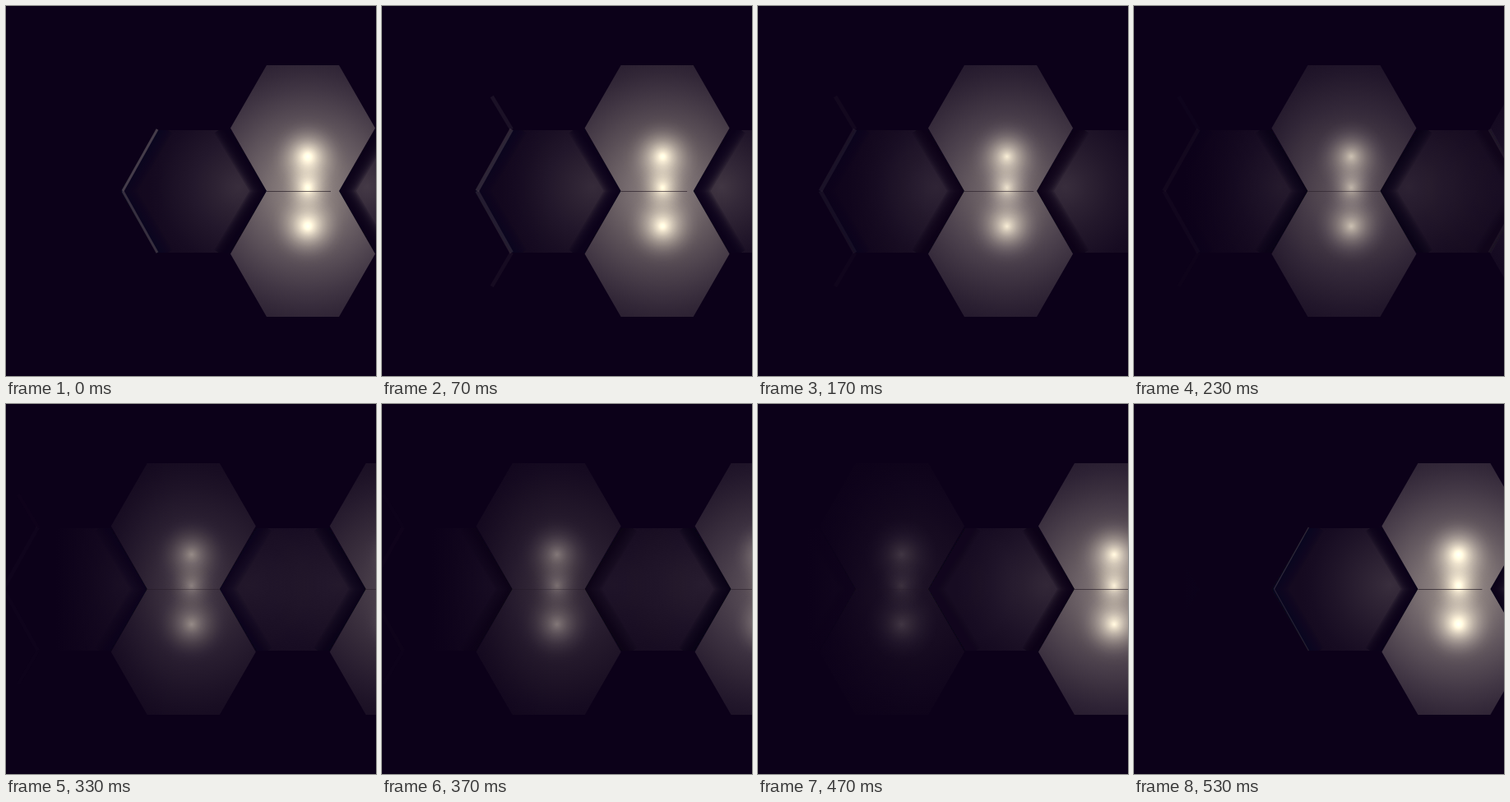
Write an HTML page with a canvas that moves like this. It is 450 px wide and 450 px high and loops after 560 ms.

```html
<!DOCTYPE html>
<html lang="en">
<head>
<meta charset="utf-8">
<title>Hexagon lights</title>
<style>
  html, body { margin: 0; width: 100%; height: 100%; overflow: hidden; background: #0c0119; }
  canvas { display: block; width: 450px; height: 450px; }
</style>
</head>
<body>
<canvas id="stage" width="450" height="450"></canvas>
<script>
const ctx = document.getElementById('stage').getContext('2d');
const LOOP = 560, PERIOD = 266, STEP = 13.2, MID = 225;
const BG = '12,1,25';

const clamp = v => Math.min(1, Math.max(0, v));
const smooth = v => clamp(v) ** 2 * (3 - 2 * clamp(v));
const warm = level => `rgb(${level},${level},${level * .8})`;

// A pair lights up as it enters on the right and dims on its way left
const brightness = x => smooth((x - 130) / 250) * clamp((535 - x) / 130);

function hex(cx, cy, halfW, halfH) {
  const f = halfW / 2;
  ctx.moveTo(cx - halfW, cy);
  ctx.lineTo(cx - f, cy - halfH);
  ctx.lineTo(cx + f, cy - halfH);
  ctx.lineTo(cx + halfW, cy);
  ctx.lineTo(cx + f, cy + halfH);
  ctx.lineTo(cx - f, cy + halfH);
  ctx.closePath();
}

// Radial light that falls off as (1 - distance)^power
function glow(x, y, r, peak, power) {
  const g = ctx.createRadialGradient(x, y, 0, x, y, r);
  for (let u = 0; u <= 1; u += .125) g.addColorStop(u, warm(peak * (1 - u) ** power));
  ctx.fillStyle = g;
  ctx.fillRect(x - r, y - r, 2 * r, 2 * r);
}

function drawSide(cx, left, right) {
  ctx.save();
  ctx.beginPath();
  hex(cx, MID + .5, 89, 74.5);
  ctx.clip();
  ctx.globalCompositeOperation = 'lighter';
  ctx.fillStyle = warm(9);
  ctx.fillRect(cx - 90, 140, 180, 170);
  glow(cx - 55, MID - 5, 110, 48 * left, 1.3);
  glow(cx + 55, MID - 5, 110, 36 * right, 1.3);

  // Shadow along the edges that touch a pair
  ctx.globalCompositeOperation = 'source-over';
  for (const [dir, lit] of [[-1, left], [1, right]]) {
    ctx.strokeStyle = `rgba(${BG},${.08 + .14 * lit})`;
    ctx.beginPath();
    ctx.moveTo(cx + dir * 41, 145);
    ctx.lineTo(cx + dir * 89, MID);
    ctx.lineTo(cx + dir * 41, 306);
    for (let w = 3; w <= 36; w += 3) {
      ctx.lineWidth = w;
      ctx.stroke();
    }
  }
  ctx.restore();
}

function drawPair(x) {
  const lit = brightness(x);
  if (lit <= 0) return;
  const lamp = lit ** .45;
  const gx = x + 6 + (361 - x) * .027;
  ctx.save();
  ctx.beginPath();
  hex(x, 148.5, 88, 76.5);
  hex(x, 301.5, 88, 76.5);
  ctx.clip();
  ctx.globalCompositeOperation = 'lighter';
  ctx.fillStyle = warm(32 * lit);
  ctx.fillRect(x - 90, 70, 180, 310);
  glow(gx, MID, 165, 59 * (lit + lamp), 1.2);
  glow(gx, 183, 50, 170 * lamp, 2.2);
  glow(gx, 221, 36, 120 * lamp, 2.2);
  glow(gx, 268, 50, 170 * lamp, 2.2);
  ctx.restore();

  // The seam stays open a little at its right end while the pair is far right
  const end = 34 + 10 * clamp((361 - x) / 105);
  ctx.fillStyle = `rgba(32,22,32,${.65 * lamp})`;
  ctx.fillRect(x - 44, MID, 44 + end, 1);
}

function drawBevel(x) {
  const onLeft = x < MID;
  const dir = onLeft ? 1 : -1;
  const alpha = onLeft
    ? .9 * clamp((150 - x) / 40) * Math.min(1, Math.exp((x - 95) / 50))
    : .28 * clamp((x - 495) / 20);
  if (alpha <= 0) return;
  ctx.lineWidth = onLeft ? Math.min(5, .8 + (130 - x) / 16) : 4;

  const edge = (strength, ...points) => {
    ctx.strokeStyle = `rgba(76,67,79,${alpha * strength})`;
    ctx.beginPath();
    for (const [dx, y] of points) ctx.lineTo(x + dir * dx, y);
    ctx.stroke();
  };
  edge(1, [89, 150], [47, MID]);
  edge(.75, [47, MID], [89, 300]);
  if (x < 80) {
    edge(.45, [65, 110], [89, 150]);
    edge(.3, [89, 300], [65, 341]);
  }
}

function drawFade() {
  const g = ctx.createLinearGradient(60, 0, 210, 0);
  for (let u = 0; u <= 1; u += .125) g.addColorStop(u, `rgba(${BG},${(1 - u) ** 1.6})`);
  ctx.fillStyle = g;
  ctx.fillRect(0, 0, 210, 450);
}

function draw(t) {
  // 30 steps per second on a 10 ms clock, with two double moves per loop
  const k = Math.floor((Math.floor(t / 10) + .5) * .3);
  const x = 361 - STEP * (k + (k >= 6) + (k >= 15));
  const pairs = [-1, 0, 1].map(i => x + i * PERIOD);

  ctx.fillStyle = `rgb(${BG})`;
  ctx.fillRect(0, 0, 450, 450);
  for (const p of pairs) drawSide(p + PERIOD / 2, brightness(p), brightness(p + PERIOD));
  pairs.forEach(drawPair);
  drawFade();
  pairs.forEach(drawBevel);
}

let start = null;
function tick(now) {
  if (start === null) start = now;
  draw(Math.max(0, now - start) % LOOP);
  requestAnimationFrame(tick);
}
draw(0);
requestAnimationFrame(tick);
</script>
</body>
</html>
```
